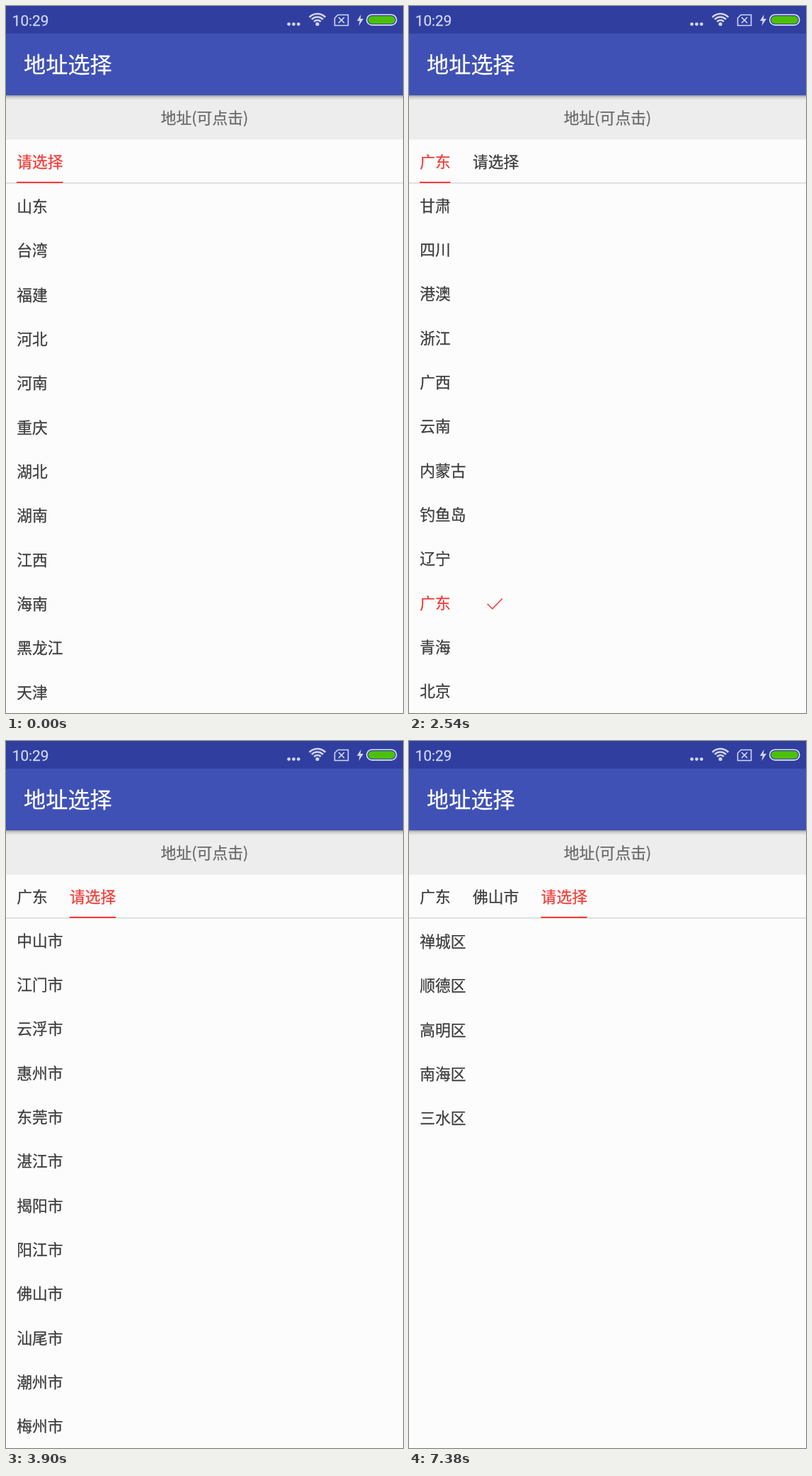
Recreate the animation shown at these times as an HTML page with a canvas. Size 561x998 px, loop 8 s.

```html
<!DOCTYPE html>
<html lang="zh-CN">
<head>
<meta charset="utf-8">
<title>地址选择</title>
<style>
html, body { margin: 0; width: 100%; height: 100%; overflow: hidden; background: #fcfcfc; }
canvas { display: block; width: 561px; height: 998px; }
</style>
</head>
<body>
<canvas id="stage" width="561" height="998"></canvas>
<script>
const W = 561, H = 998, LOOP = 8000, STEP = 40;
const LIST_TOP = 250, ROW = 62.35, SIZE = 21.8, LEFT = 15.2, TAB_GAP = 31.2;
const RED = '#f33b36', DARK = '#3c3c3c', PAPER = '#fcfcfc', ICON = '#d0d6f0';
const FONT = '"Noto Sans CJK SC", "Noto Sans CJK", sans-serif';

const pages = [
  '山东 台湾 福建 河北 河南 重庆 湖北 湖南 江西 海南 黑龙江 天津 贵州 陕西 新疆 江苏 安徽 ' +
  '西藏 吉林 上海 山西 宁夏 甘肃 四川 港澳 浙江 广西 云南 内蒙古 钓鱼岛 辽宁 广东 青海 北京',
  '河源市 茂名市 韶关市 汕头市 清远市 深圳市 珠海市 肇庆市 广州市 中山市 江门市 云浮市 ' +
  '惠州市 东莞市 湛江市 揭阳市 阳江市 佛山市 汕尾市 潮州市 梅州市',
  '禅城区 顺德区 高明区 南海区 三水区'
].map(s => s.split(' '));
const picks = [{ name: '广东', at: 2540 }, { name: '佛山市', at: 7060 }];

const c = document.getElementById('stage').getContext('2d');
const clamp = v => Math.max(0, Math.min(1, v));
const lerp = (a, b, p) => a + (b - a) * p;
const slideEase = p => 1 - (1 - p) ** 5;

// cubic-bezier(.4, 0, .2, 1)
function standardEase(x) {
  let lo = 0, hi = 1;
  for (let i = 0; i < 20; i++) {
    const u = (lo + hi) / 2;
    const bx = 1.2 * u * (1 - u) ** 2 + 0.6 * u * u * (1 - u) + u ** 3;
    if (bx < x) lo = u; else hi = u;
  }
  return lo * lo * (3 - 2 * lo);
}

function rect(x, y, w, h, color) {
  c.fillStyle = color;
  c.fillRect(x, y, w, h);
}

// A hairline outline gives the slightly heavier strokes of the phone's font.
function text(s, x, y, color, size = SIZE, align = 'left', font = FONT) {
  c.font = size + 'px ' + font;
  c.textAlign = align;
  c.fillStyle = c.strokeStyle = color;
  c.lineWidth = 0.25;
  y = Math.round(y);
  c.fillText(s, x, y);
  c.strokeText(s, x, y);
}

function path(points, color, width, fill) {
  c.beginPath();
  points.forEach(([x, y]) => c.lineTo(x, y));
  if (fill) {
    c.fillStyle = color;
    c.fill();
  } else {
    c.strokeStyle = color;
    c.lineWidth = width;
    c.stroke();
  }
}

function pill(x, y, w, h) {
  c.beginPath();
  c.roundRect(x, y, w, h, h / 2);
}

function statusBar() {
  rect(0, 0, W, 39, '#303f9f');
  text('10:29', 8.7, 28, ICON, 20.8, 'left', 'Roboto, sans-serif');
  c.fillStyle = ICON;
  for (const x of [399.7, 406.5, 413.3]) {
    c.beginPath();
    c.arc(x, 25.6, 2.4, 0, 7);
    c.fill();
  }
  c.strokeStyle = ICON;
  c.lineWidth = 2.6;
  for (const r of [6.5, 11, 15.5]) {
    c.beginPath();
    c.arc(440, 26.5, r, -Math.PI * 0.76, -Math.PI * 0.24);
    c.stroke();
  }
  c.beginPath();
  c.arc(440, 25.5, 2.6, 0, 7);
  c.fill();
  path([[469, 12.5], [483.5, 12.5], [483.5, 27.5], [464.5, 27.5], [464.5, 17], [469, 12.5], [470, 12.5]], ICON, 1.6);
  path([[470, 16], [478, 24]], ICON, 1.7);
  path([[478, 16], [470, 24]], ICON, 1.7);
  path([[501.5, 12], [496, 21], [499.7, 21], [498.5, 28], [505, 18], [501, 18]], ICON, 0, true);
  pill(509.8, 12.3, 42, 14.6);
  c.strokeStyle = '#dfe3f5';
  c.lineWidth = 1.6;
  c.stroke();
  pill(511.8, 14.3, 38, 10.6);
  c.fillStyle = '#4cc008';
  c.fill();
}

function header() {
  rect(0, 126, W, 62.5, '#ededed');
  const shade = c.createLinearGradient(0, 126, 0, 133);
  shade.addColorStop(0, 'rgba(0,0,0,.36)');
  shade.addColorStop(0.4, 'rgba(0,0,0,.13)');
  shade.addColorStop(1, 'rgba(0,0,0,0)');
  rect(0, 126, W, 7, shade);
  rect(0, 39, W, 87, '#3f51b5');
  statusBar();
  text('地址选择', 25, 94, '#fff', 31.2);
  text('地址(可点击)', W / 2, 166, '#686868', SIZE, 'center');
}

function tabs(t, chosen) {
  const names = [...chosen.map(p => p.name), '请选择'];
  const last = chosen.length && chosen[chosen.length - 1];
  const moving = last ? clamp((t - last.at) / 320) : 1;
  const active = names.length - (moving > 0 ? 1 : 2);
  const boxes = [];
  let x = LEFT;
  names.forEach((name, i) => {
    const w = name.length * SIZE;
    text(name, x, 228, i === active ? RED : DARK);
    boxes.push([x - 0.2, w]);
    x += w + TAB_GAP;
  });
  rect(0, 249.3, W, 1.2, '#cfcfcf');
  const to = boxes[boxes.length - 1], from = boxes[boxes.length - 2] || to;
  const p = standardEase(moving);
  rect(lerp(from[0], to[0], p), 248, lerp(from[1], to[1], p), 2, '#fc3a36');
}

function scrollOf(page, t) {
  const end = pages[page].length * ROW - (H - LIST_TOP) + 1;
  if (page === 0) return t < 1660 ? 0 : lerp(134.8, end, clamp((t - 1660) / 320));
  if (page === 1) return end * clamp((t - 3660) / 240);
  return 0;
}

function list(page, left, t) {
  const scroll = scrollOf(page, t), pick = picks[page];
  pages[page].forEach((name, i) => {
    const y = LIST_TOP + i * ROW - scroll;
    if (y < LIST_TOP - ROW || y > H) return;
    const picked = pick && name === pick.name && t >= pick.at;
    text(name, left + LEFT, y + 40.8, picked ? RED : DARK);
    if (picked) {
      const x = left + LEFT + name.length * SIZE + 52, m = y + 34;
      path([[x, m], [x + 7, m + 7], [x + 21, m - 7.5]], RED, 1.6);
    }
  });
}

function draw(t) {
  const chosen = picks.filter(p => t >= p.at);
  const position = chosen.reduce((sum, p) => sum + slideEase(clamp((t - p.at) / 240)), 0);
  rect(0, 0, W, H, PAPER);
  c.save();
  c.beginPath();
  c.rect(0, LIST_TOP, W, H - LIST_TOP);
  c.clip();
  pages.forEach((_, i) => {
    const left = (i - position) * W;
    if (Math.abs(left) < W) list(i, left, t);
  });
  c.restore();
  header();
  tabs(t, chosen);
}

const start = performance.now();
function tick() {
  const t = (performance.now() - start) % LOOP;
  draw(Math.floor((t - 20) / STEP) * STEP + 20);
  requestAnimationFrame(tick);
}
tick();
</script>
</body>
</html>
```
